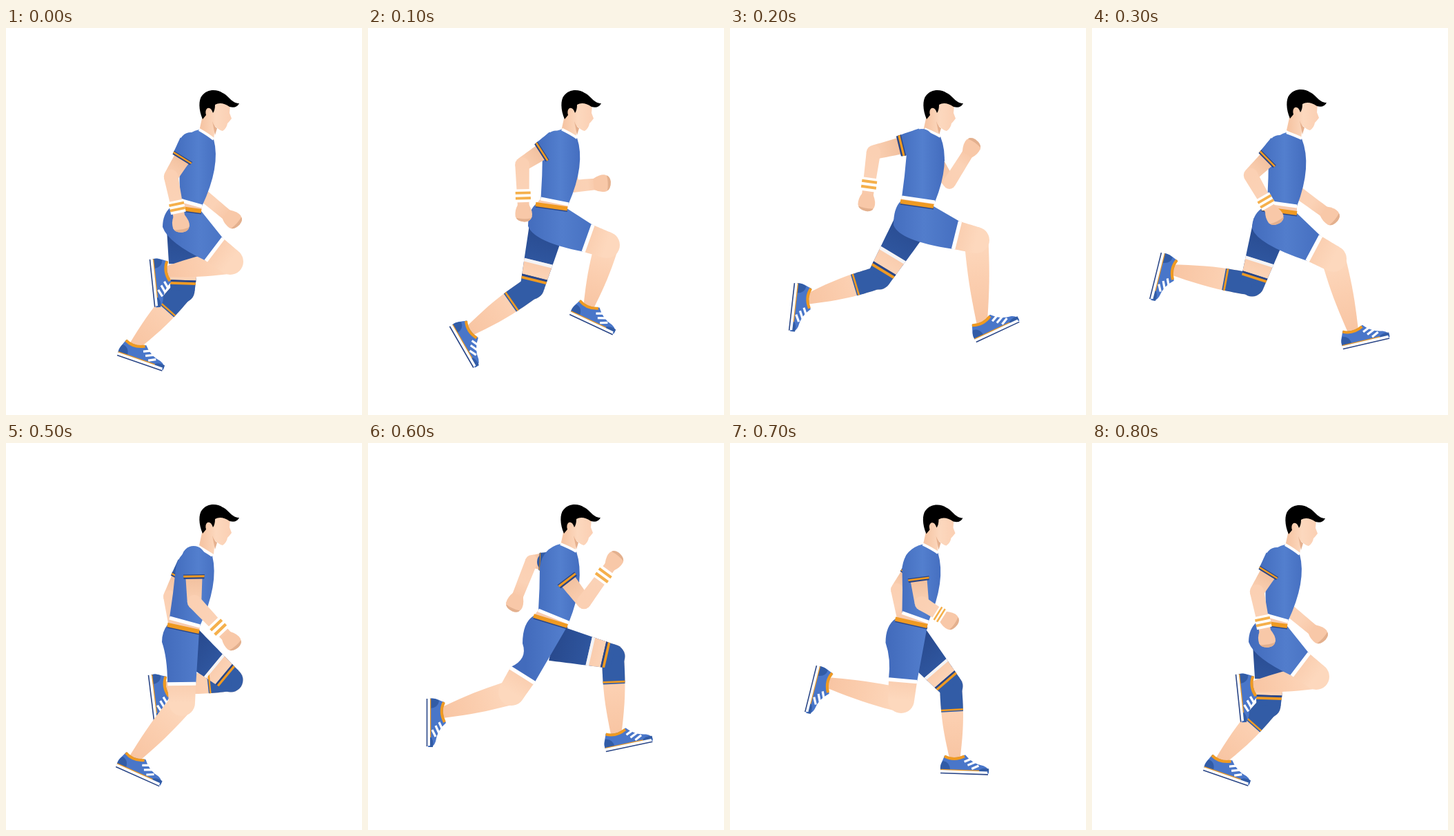
An HTML page with a canvas for the animation above (0.9 s loop, 516 px wide and 560 px high).

```html
<!DOCTYPE html>
<html lang="en">
<head>
<meta charset="utf-8">
<title>Runner</title>
<style>
html, body { margin: 0; width: 100%; height: 100%; overflow: hidden; background: #fff; }
canvas { display: block; }
</style>
</head>
<body>
<canvas id="stage" width="516" height="560"></canvas>
<script>
const ctx = document.getElementById('stage').getContext('2d');
const ORANGE = '#ef9a22', NAVY = '#2a4687', WHITE = '#fff', SHADE = '#325ca6';

const gradient = (x0, y0, x1, y1, ...colors) => {
  const g = ctx.createLinearGradient(x0, y0, x1, y1);
  colors.forEach((c, i) => g.addColorStop(i / (colors.length - 1), c));
  return g;
};
const CLOTH = gradient(246, 0, 312, 0, '#446ebf', '#537fce', '#426bbd');
const SHORTS = gradient(228, 0, 335, 0, '#426bbc', '#527dcc', '#446ebf');

// Arms: shoulder, elbow, fist. Legs: hip, knee, shoe heel, shoe angle.
const standFar = {
  head: [0, 0], neck: [280, 147], collar: [301, 161], back: [250, 180],
  hemBack: [252, 249], hemFront: [284, 258], waistBack: [239, 259], waistFront: [283, 265], seat: [227, 288],
  nearArm: [268, 168, 239, 215, 253, 283], farArm: [285, 185, 276, 234, 328, 277],
  nearLeg: [254, 284, 325, 338, 208, 335, 84], farLeg: [259, 285, 256, 380, 161, 474, 19]
};
const leapNear = {
  head: [0, 0], neck: [282, 146], collar: [305, 157], back: [256, 182],
  hemBack: [249, 245], hemFront: [297, 252], waistBack: [247, 251], waistFront: [295, 258], seat: [237, 285],
  nearArm: [278, 163, 208, 180, 198, 252], farArm: [285, 175, 318, 224, 350, 173],
  nearLeg: [268, 285, 357, 307, 357, 455, -25], farLeg: [268, 275, 216, 361, 93, 369, 96.5]
};
const reachNear = {
  head: [2, -1], neck: [282, 151], collar: [304, 160], back: [256, 182],
  hemBack: [254, 252], hemFront: [297, 258], waistBack: [246, 261], waistFront: [297, 268], seat: [232, 290],
  nearArm: [272, 172, 230, 213, 264, 272], farArm: [292, 190, 292, 233, 345, 272],
  nearLeg: [262, 287, 350, 334, 364, 465, -13], farLeg: [260, 283, 232, 371, 100, 325, 104]
};
const standNear = {
  head: [0, -1], neck: [277, 150], collar: [299, 163], back: [246, 182],
  hemBack: [237, 253], hemFront: [281, 265], waistBack: [234, 263], waistFront: [280, 273], seat: [226, 288],
  nearArm: [272, 166, 273, 230, 327, 287], farArm: [262, 175, 237, 222, 246, 276],
  nearLeg: [254, 290, 255, 376, 159, 469, 24], farLeg: [262, 290, 326, 343, 206, 336, 83]
};
const leapFar = {
  head: [-1, -1], neck: [279, 146], collar: [302, 157], back: [249, 180],
  hemBack: [247, 242], hemFront: [291, 260], waistBack: [240, 250], waistFront: [289, 265], seat: [224, 290],
  nearArm: [271, 175, 313, 230, 357, 170], farArm: [258, 172, 237, 171, 213, 231],
  nearLeg: [257, 283, 208, 361, 85, 370, 90], farLeg: [268, 289, 355, 309, 345, 447, -12]
};

const halfway = (a, b, changes) => {
  const pose = {};
  for (const key in a) pose[key] = a[key].map((v, i) => (v + b[key][i]) / 2);
  return Object.assign(pose, changes);
};
const pushFar = halfway(standFar, leapNear, {
  nearLeg: [262, 284, 346, 314, 292, 415, 25], farLeg: [261, 282, 238, 375, 118, 432, 60]
});
const landNear = halfway(reachNear, standNear, {
  nearLeg: [260, 289, 307, 372, 262, 500, 4]
});
const landFar = halfway(leapFar, standFar, {
  nearArm: [270, 171, 278, 232, 318, 257], farArm: [270, 176, 242, 212, 252, 262],
  nearLeg: [256, 284, 248, 372, 125, 322, 104], farLeg: [264, 287, 320, 352, 305, 478, 2]
});
const cycle = [standFar, pushFar, leapNear, reachNear, landNear, standNear, leapFar, landFar, standFar];

function shape(path, fill) {
  ctx.fillStyle = fill;
  ctx.fill(new Path2D(path));
}
function line(path, color, width) {
  ctx.strokeStyle = color;
  ctx.lineWidth = width;
  ctx.stroke(new Path2D(path));
}
function disc(x, y, r, fill) {
  ctx.fillStyle = fill;
  ctx.beginPath();
  ctx.arc(x, y, r, 0, 7);
  ctx.fill();
}

// A straight limb whose width runs from w0 to w1, swelling in the middle.
function bone(x0, y0, x1, y1, w0, w1, swell = 0) {
  const length = Math.hypot(x1 - x0, y1 - y0) || 1;
  const nx = (y1 - y0) / length, ny = (x0 - x1) / length;
  const edge = (t, side) => {
    const w = side * (w0 + (w1 - w0) * t + swell * Math.sin(Math.PI * t)) / 2;
    return [x0 + (x1 - x0) * t + nx * w, y0 + (y1 - y0) * t + ny * w];
  };
  const fillPart = (from, to, fill) => {
    const front = [], rear = [];
    for (let i = 0; i <= 10; i++) {
      const t = from + (to - from) * i / 10;
      front.push(edge(t, 1));
      rear.unshift(edge(t, -1));
    }
    shape('M' + front.concat(rear).join('L') + 'Z', fill);
  };
  return { edge, fillPart, angle: Math.atan2(y1 - y0, x1 - x0) };
}

function place(x, y, angle, draw) {
  ctx.save();
  ctx.translate(x, y);
  ctx.rotate(angle);
  draw();
  ctx.restore();
}

function shoe(x, y, degrees) {
  place(x, y, degrees * Math.PI / 180, () => {
    shape('M0-4C-2-13 3-18 5-26Q20-20 35-28Q46-15 62-13Q71-10 70-2Z', '#4976c9');
    shape('M0-5C-1-11 1-15 3-18Q13-17 14-5Z', SHADE);
    shape('M54-5Q60-11 70-9L70-4Z', SHADE);
    line('M5-25Q19-18 34-26', ORANGE, 4);
    line('M34-18L45-23M39-13L50-18M45-8L55-13', WHITE, 3.2);
    line('M0-5.5H56', ORANGE, 1.5);
    line('M0-3H68', WHITE, 4);
    line('M0-.5H69', NAVY, 1.6);
  });
}

function leg([hx, hy, kx, ky, sx, sy, degrees], near) {
  const a = degrees * Math.PI / 180, c = Math.cos(a), s = Math.sin(a);
  const ax = sx + 20 * c + 24 * s, ay = sy + 20 * s - 24 * c;
  const knee = near ? 38 : 35;
  const thigh = bone(hx, hy, kx, ky, near ? 48 : 53, knee);
  const shin = bone(kx, ky, ax, ay, knee - 3, 16, near ? 4 : 6);
  const thighSkin = gradient(hx, hy, kx, ky, '#efb992', '#f8c8a8', '#fdd8bd');

  shin.fillPart(0, 1.04, gradient(kx, ky, ax, ay, '#fdd8bd', '#fbceaf', '#f8c5a3'));
  disc(kx, ky, knee / 2, '#fdd8bd');
  if (near) {
    thigh.fillPart(0.68, 1, thighSkin);
  } else {
    disc(kx, ky, knee / 2, SHADE);
    shin.fillPart(0, 0.36, SHADE);
    thigh.fillPart(0.6, 1, SHADE);
    thigh.fillPart(0.6, 0.84, thighSkin);
    thigh.fillPart(0.84, 0.87, NAVY);
    thigh.fillPart(0.87, 0.91, ORANGE);
    shin.fillPart(0.32, 0.345, ORANGE);
    thigh.fillPart(0, 0.6, gradient(hx, hy, kx, ky, '#28498d', '#335eaa'));
    thigh.fillPart(0.6, 0.65, '#f4f4f6');
  }
  shoe(sx, sy, degrees);
  return thigh;
}

function shorts({ seat: [gx, gy], waistBack: wb, waistFront: wf }, thigh) {
  shape(`M${wf}L${thigh.edge(0.67, 1)}L${thigh.edge(0.67, -1)}Q${gx + 8},${gy + 23} ${gx},${gy}` +
    `Q${gx},${wb[1] + 10} ${wb}Z`, SHORTS);
  thigh.fillPart(0.65, 0.71, WHITE);
}

function waistband({ waistBack: [bx, by], waistFront: [fx, fy] }) {
  line(`M${bx},${by + 3}L${fx},${fy + 3}`, NAVY, 3);
  line(`M${bx},${by}L${fx},${fy}`, ORANGE, 6);
}

function arm([sx, sy, ex, ey, fx, fy], near) {
  const elbow = near ? 20.5 : 18;
  const upper = bone(sx, sy, ex, ey, 27, elbow);
  const sleeve = bone(sx, sy, ex, ey, near ? 36 : 28, near ? 23 : 22);
  const fore = bone(ex, ey, fx, fy, elbow, 16);
  const skin = gradient(ex, ey, fx, fy, '#fbd0b3', '#fbd2b6', '#f7c4a3');

  upper.fillPart(0.4, 1, gradient(sx, sy, ex, ey, '#eab48e', '#fbd0b3'));
  disc(ex, ey, elbow / 2, '#fbd0b3');
  fore.fillPart(0, 1, skin);
  place(fx, fy, fore.angle, () => {
    shape('M-12-8Q-1-14 6-12Q13-9 13-1Q12 10 5 12Q-4 13-12 8Z', '#f8c8a8');
    shape('M8-11Q13-9 13-1Q12 9 7 11Q10 0 8-11Z', '#e3b08e');
  });
  if (near) {
    const band = bone(ex, ey, fx, fy, 22, 22);
    band.fillPart(0.51, 0.78, WHITE);
    band.fillPart(0.56, 0.615, '#f5b04c');
    band.fillPart(0.67, 0.725, '#f5b04c');
  }
  const cloth = near ? CLOTH : SHADE;
  disc(sx, sy, near ? 17 : 13, cloth);
  sleeve.fillPart(0, 0.45, cloth);
  sleeve.fillPart(0.38, 0.48, NAVY);
  sleeve.fillPart(0.4, 0.445, ORANGE);
}

function shirt({ neck: n, collar: c, back: b, hemBack: hb, hemFront: hf, waistBack: wb, waistFront: wf }) {
  shape(`M${hb}L${hf}L${wf}L${wb}Z`, '#f8cbae');
  shape(`M${n}L${c}Q${(c[0] + hf[0]) / 2 + 19},${(c[1] + hf[1]) / 2 - 10} ${hf}L${hb}` +
    `Q${(b[0] + hb[0]) / 2 + 1},${(b[1] + hb[1]) / 2} ${b}Q${b[0] + 4},${n[1] + 6} ${n}Z`, CLOTH);
  line(`M${n}Q${(n[0] + c[0]) / 2 + 2},${(n[1] + c[1]) / 2} ${c}`, WHITE, 4);
  line(`M${hb}L${hf}`, WHITE, 5);
}

function head([x, y]) {
  place(x, y, 0, () => {
    shape('M286 122L280 149L301 162L303 142Q309 148 314 149Q320 145 321 138L323 136L327 131L324 123L325 111L300 105Z',
      gradient(284, 0, 325, 0, '#f6c5a4', '#fcd8be', '#fbd0b4'));
    shape('M299 135Q302 143 306 145L303 155Z', '#e6b18f');
    shape('M285 132C279 118 279 104 284 98C291 88 306 88 314 94C323 98 327 109 338 109' +
      'Q334 117 324 114Q312 106 303 111Q303 119 300 123Q297 114 292 116Q288 119 290 126Z', '#000');
  });
}

function draw() {
  const pose = cycle[Math.floor(performance.now() % 900 / 100)];
  ctx.fillStyle = WHITE;
  ctx.fillRect(0, 0, 516, 560);
  arm(pose.farArm, false);
  leg(pose.farLeg, false);
  shorts(pose, leg(pose.nearLeg, true));
  head(pose.head);
  shirt(pose);
  waistband(pose);
  arm(pose.nearArm, true);
  requestAnimationFrame(draw);
}
draw();
</script>
</body>
</html>
```
